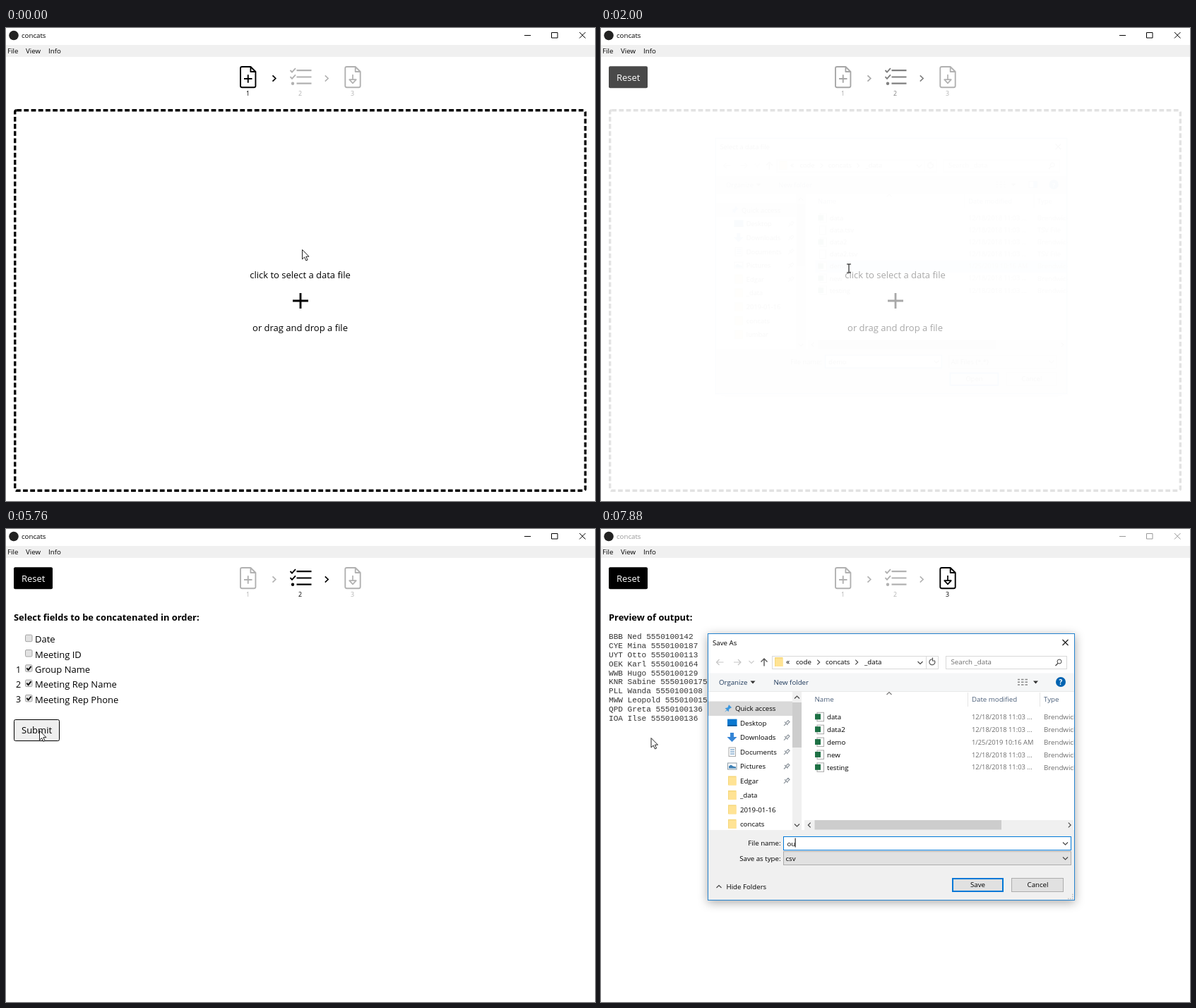
An HTML page for the animation above (8 s loop, 834 by 671 pixels).

```html
<!DOCTYPE html>
<html lang="en">
<head>
<meta charset="utf-8">
<title>concats</title>
<style>
html, body { margin: 0; width: 100%; height: 100%; overflow: hidden; background: #fff; }
svg { display: block; }
text { font-family: "Open Sans", "Noto Sans", sans-serif; white-space: pre; }
.mono { font-family: "Liberation Mono", monospace; fill: #333; }
.dialog { filter: drop-shadow(0 3px 7px rgba(0, 0, 0, .34)); }
#spot { mix-blend-mode: multiply; }
</style>
</head>
<body>
<script>
const LOOP = 8000;
const GREY = '#6d6d6d', BLUE = '#0078d7', DARK = '#444';

// Markup helpers; text is placed by the middle of its capitals.
const text = (x, y, s, size = 9.7, attr = '') =>
  `<text x="${x}" y="${y + size * .36}" font-size="${size}" ${attr}>${s}</text>`;
const rect = (x, y, w, h, fill, attr = '') =>
  `<rect x="${x}" y="${y}" width="${w}" height="${h}" fill="${fill}" ${attr}/>`;
const line = (d, color = '#000', width = 1, attr = '') =>
  `<path d="${d}" fill="none" stroke="${color}" stroke-width="${width}" ${attr}/>`;
const shape = (d, fill) => `<path d="${d}" fill="${fill}"/>`;
const group = (id, body, attr = '') => `<g id="${id}" ${attr}>${body}</g>`;
const frame = (x, y, w, h, fill, color, width = 1) =>
  rect(x, y, w, h, fill, `stroke="${color}" stroke-width="${width}"`);
const down = (x, y, color = DARK) => line(`M${x - 3.5} ${y - 1.5}l3.5 3.5 3.5-3.5`, color, 1.1);
const up = (x, y, color = DARK) => line(`M${x - 3.5} ${y + 2}l3.5-3.5 3.5 3.5`, color, 1.1);
const side = (x, y, dir, color = DARK) =>
  line(`M${x - dir * 1.7} ${y - 3.3}l${dir * 3.4} 3.3 ${-dir * 3.4} 3.3`, color, 1.1);
const drop = (x, y) => shape(`M${x - 3.5} ${y - 2}h7l-3.5 4z`, '#333');

// Main window
function windowBar() {
  return '<circle cx="11" cy="10.5" r="6.8" fill="#222"/>' +
    group('caption', text(22, 11, 'concats') +
      line('M734 10.5h9M772.5 6.5h8.5v7.5h-8.5zM812 6l8.5 8.5M820.5 6l-8.5 8.5')) +
    rect(0, 24, 834, 17, '#f0f0f0') +
    text(2, 32.5, 'File') + text(28, 32.5, 'View') + text(60, 32.5, 'Info');
}

const page = (x, inner) =>
  line(`M${x + 3} 55h12.2l7 7v20a2.2 2.2 0 0 1-2.2 2.2h-17a2.2 2.2 0 0 1-2.2-2.2v-24.8a2.2 2.2 0 0 1 2.2-2.2z` +
    `M${x + 15.2} 55v7h7`, '#000', 1.9, 'stroke-linejoin="round"') + inner;
const label = (x, n) => text(x, 92.5, n, 8.8, 'text-anchor="middle"');

function steps() {
  return group('step1', page(331.2, line('M337 72h11.5M342.75 66.25v11.5', '#000', 1.9)) + label(342.5, 1)) +
    group('arrow1', line('M377.5 67.3l4.3 4.2-4.3 4.2', '#000', 1.7)) +
    group('step2', line('M411.5 60.2h21M411.5 69.5h21M411.5 78.7h21', '#000', 2.2) +
      line('M402.5 60l2.5 2.7 5-5.5M402.5 69.2l2.5 2.7 5-5.5', '#000', 1.9) +
      '<circle cx="406" cy="78.7" r="2.2"/>' + label(416.5, 2)) +
    group('arrow2', line('M451.8 67.3l4.3 4.2-4.3 4.2', '#000', 1.7)) +
    group('step3', page(479.5, line('M491 66v7M486.2 73.2h9.6l-4.8 5.2z', '#000', 1.7, 'stroke-linejoin="round"')) +
      label(490.5, 3));
}

function dropPage() {
  const mid = 'text-anchor="middle"';
  return group('dash', rect(12.7, 116.7, 807.6, 539.6, 'none',
      'rx="2.5" stroke="#000" stroke-width="3.4" stroke-dasharray="6.8 3.4"')) +
    text(416.5, 350.5, 'click to select a data file', 13, mid) +
    line('M406 387h22M417 376v22', '#000', 2.8) +
    text(416.5, 425.5, 'or drag and drop a file', 13, mid);
}

const fields = ['Date', 'Meeting ID', 'Group Name', 'Meeting Rep Name', 'Meeting Rep Phone'];
const checkAt = { 2: 3480, 3: 4260, 4: 5050 };

function fieldPage() {
  const rows = fields.map((name, i) => {
    const y = 156.2 + i * 21.3;
    return rect(27.5, y - 6, 9.5, 9.5, '#e2e2e2', 'rx="1.5" stroke="#a3a3a3"') +
      text(41, y + .5, name, 13) +
      (checkAt[i] ? group('check' + i, text(14, y + .5, i - 1, 12.5) +
        line(`M29.3 ${y - 1.5}l2.3 2.6 4-5`, '#111', 1.9)) : '');
  });
  return text(11, 125, 'Select fields to be concatenated in order:', 12.9, 'font-weight="700"') +
    rows.join('') +
    group('submit', rect(11.5, 270.5, 64, 30, '#fff', 'id="submitBox" rx="2" stroke="#000"') +
      text(22, 285.7, 'Submit', 13));
}

const preview = ['BBB Ned 5550100142', 'CYE Mina 5550100187', 'UYT Otto 5550100113', 'OEK Karl 5550100164',
  'WWB Hugo 5550100129', 'KNR Sabine 5550100175', 'PLL Wanda 5550100108', 'MWW Leopold 5550100151',
  'QPD Greta 5550100136', 'IOA Ilse 5550100136'];

const previewPage = () =>
  text(11, 125, 'Preview of output:', 12.9, 'font-weight="700"') +
  preview.map((s, i) => text(11, 152.5 + i * 12.78, s, 11.08, 'class="mono"')).join('');

// File dialogs
const folder = (x, y) => rect(x, y - 6.5, 11.5, 13, '#f5d77a') + rect(x + 1, y - 5, 10.5, 11.5, '#ffe394');
const sheet = (x, y) => frame(x, y - 6, 9.5, 12.5, '#fff', '#a8a8a8');
const pin = (x, y) => line(`M${x - 4} ${y + 4}l3-3M${x - 3} ${y - 1.5}l4.5 4.5M${x - 1} ${y - .5}l3-3 2 2-3 3`, '#8a929a', 1.2);

const treeIcons = [
  y => shape(`M175 ${y + 5}l3-3.5-2.5-2 4-1 1.5-4 4 4-3.5 2-1 4-2-2z`, '#3a96dd'),
  y => rect(179, y - 5.5, 13.5, 10, '#0a78d0') + rect(179, y + 3, 13.5, 1.5, '#064f8c'),
  y => shape(`M183 ${y - 6.5}h5v6h4.5l-7 7-7-7h4.5z`, '#3585d6'),
  y => sheet(181, y) + line(`M183 ${y - 3}h6M183 ${y}h6M183 ${y + 3}h6`, '#4a86b8'),
  y => frame(179.5, y - 4.5, 12.5, 9, '#fff', '#8a9aa5') + shape(`M181 ${y + 3}v-3l3-2 3 2 4 1v2z`, '#3d7fb3')
];
const tree = ['Quick access', 'Desktop', 'Downloads', 'Documents', 'Pictures', 'Edgar',
  '_data', '2019-01-16', 'concats', 'lumbar'];

function fileRow(name, y) {
  const plain = name.endsWith('.tsv');
  return (plain ? sheet(305, y) : sheet(306, y) + rect(303, y - 4, 8, 8, '#1e7145')) +
    text(320, y + .3, name) +
    text(525, y + .3, name === 'demo' ? '1/25/2019 10:16 AM' : '12/18/2018 11:03 ...', 9.35, `fill="${GREY}"`) +
    text(627, y + .3, plain ? 'TSV File' : 'Brendwick', 9.7, `fill="${GREY}"`);
}

const button = (x, name, main) =>
  (main ? frame(x + 1, 496, 71, 18, '#e1e1e1', BLUE, 2) : frame(x - .5, 495.5, 73, 19, '#e1e1e1', '#adadad')) +
  text(x + 36.5, 505, name, 9.7, 'text-anchor="middle"');

function dialog(id, o) {
  const b = o.bottom, ink = 'fill="#1e395b"', head = 'fill="#4c607a"';
  const body = rect(151, 148, 521, 380, '#fff') +
    text(158, 161.5, o.title) + line('M653.5 157l8 8M661.5 157l-8 8', '#111', 1.1) +
    line('M173.5 189h-10m4-4l-4 4 4 4M188 189h10m-4-4l4 4-4 4', '#c6c6c6', 1.2) + down(213, 188.5, '#ccc') +
    line('M231 194.5v-10.5m-4.5 4.5l4.5-4.5 4.5 4.5', '#555', 1.4) +
    frame(242.5, 180.5, 235, 18, '#fff', '#d9d9d9') + folder(246, 188.5) +
    text(262, 188, '«', 10.5) + text(276, 188.5, 'code') + side(308, 189, 1) +
    text(318, 188.5, 'concats') + side(362, 189, 1) + text(373, 188.5, '_data') + down(452, 189.5) +
    line('M460.5 181v17', '#d9d9d9') + line('M472.5 187a4 4 0 1 1-3-2.2m0-2.3v4.5h3.5', '#555', 1.2) +
    frame(488.5, 180.5, 171, 18, '#fff', '#d9d9d9') + text(495.5, 189, 'Search _data', 9.7, `fill="${GREY}"`) +
    '<circle cx="649" cy="188" r="3" fill="none" stroke="#444"/>' + line('M647 190.5l-3.5 3.5', DARK, 1.3) +
    rect(152, 204.5, 520, 26.5, '#f5f6f7') + line('M152 230.5h520', '#e8e8e8') +
    text(167, 217.5, 'Organize', 9.7, ink) + drop(215, 217.5) + text(244.5, 217.5, 'New folder', 9.7, ink) +
    [0, 3.7, 7.4].map(dy => line(`M${o.viewX} ${213.5 + dy}h3m2 0h3.5m2 0h3.5`, '#888', 1.5)).join('') +
    drop(o.viewX + 25.5, 217.5) +
    (o.pane ? frame(614.5, 212.5, 12, 9, '#fff', '#667') + rect(621, 213, 5.5, 8.5, '#3a96dd') : '') +
    '<circle cx="651" cy="217" r="7" fill="#0063b1"/>' +
    text(651, 217.5, '?', 10, 'fill="#fff" font-weight="700" text-anchor="middle"') +
    rect(152, 244.5, 119, 20.5, '#d9d9d9') +
    tree.slice(0, o.treeRows).map((name, i) => {
      const y = 254.7 + i * 20.45;
      return (treeIcons[i] ? treeIcons[i](y) : folder(180, y)) + text(i ? 197 : 190, y + .3, name) +
        (i > 0 && i < 6 ? pin(263, y) : '');
    }).join('') +
    rect(271, 231, 13, b - 231, '#f0f0f0') + rect(271, 246, 13, o.thumb, '#cdcdcd') +
    up(277.5, 238.5) + down(277.5, b - 7) +
    up(408, 233, '#777') + line('M519.5 232v20M621.5 232v20', '#e5e5e5') +
    text(302.5, 242, 'Name', 9.7, head) + text(525, 242, 'Date modified', 9.7, head) + text(627, 242, 'Type', 9.7, head) +
    (o.hover || '') + o.files.map((name, i) => fileRow(name, 266.3 + i * 17.88)).join('') +
    rect(288, b - 14, 381, 14, '#f0f0f0') + rect(302.5, b - 14, 264.5, 13.5, '#cdcdcd') +
    side(295, b - 7, -1) + side(663.5, b - 7, 1) +
    rect(152, b, 520, 528 - b, '#f0f0f0') + o.footer +
    button(497, o.action, true) + button(582, 'Cancel') +
    [0, 3, 6].map(i => line(`M${661 + i} 524.5h1.5M667 ${518.5 + i}h1.5`, '#bbb', 1.5)).join('');
  return group(id, `<svg x="151" y="148" width="520" height="379" viewBox="151 148 520 379">${body}</svg>` +
    frame(151.5, 148.5, 519, 378, 'none', '#2583cf'), 'class="dialog"');
}

const combo = (x, y, w, s) =>
  frame(x, y, w, 19, '#e1e1e1', '#adadad') + text(x + 3, y + 10, s) + down(x + w - 8, y + 9.5);
const input = (id, x, y, w) =>
  frame(x, y, w, 19, '#fff', BLUE) + text(x + 5, y + 10, '', 9.7, `id="${id}Text"`) +
  line('M0 0v13', '#000', 1, `id="${id}Caret"`) + down(x + w - 8, y + 9.5);
const right = 'text-anchor="end"';

const openDialog = () => dialog('open', {
  title: 'Select a data file', action: 'Open', bottom: 461, treeRows: 10, thumb: 91, viewX: 566, pane: true,
  files: ['data', 'data.tsv', 'data2', 'data2.tsv', 'demo', 'new', 'testing'],
  hover: rect(299, 329, 372, 18, '#e5f3ff', 'id="hover"'),
  footer: text(308.5, 479.5, 'File name:', 9.7, right) + input('open', 313.5, 469.5, 172) +
    combo(496.5, 469.5, 159, 'All Files (*.*)')
});

const saveDialog = () => dialog('save', {
  title: 'Save As', action: 'Save', bottom: 427, treeRows: 9, thumb: 64, viewX: 590,
  files: ['data', 'data2', 'demo', 'new', 'testing'],
  footer: text(254.5, 446, 'File name:', 9.7, right) + input('save', 258.5, 436.5, 407) +
    text(254.5, 467.5, 'Save as type:', 9.7, right) + combo(258.5, 457.5, 407, 'csv') +
    up(167, 507) + text(177.5, 507.5, 'Hide Folders')
});

document.body.innerHTML = '<svg width="834" height="671" viewBox="0 0 834 671">' +
  windowBar() + steps() +
  group('page1', dropPage()) + group('page2', fieldPage()) + group('page3', previewPage()) +
  group('reset', rect(11, 54.3, 55, 31, '#000', 'rx="2"') + text(22, 70.5, 'Reset', 13, 'fill="#fff"')) +
  openDialog() + saveDialog() +
  '<circle id="spot" r="10" fill="#ff0" fill-opacity=".8"/>' +
  group('arrow', '<path d="M.5.5V14l3.1-3 2.3 5 2.2-1-2.3-4.8h4.2z" fill="#fff" stroke="#222"/>') +
  group('beam', line('M-3-6h2.5l.5.5.5-.5h2.5M0-5.5v11M-3 6h2.5l.5-.5.5.5h2.5', '#111', 1.1)) + '</svg>';

// Timeline
const el = id => document.getElementById(id);
const ramp = (t, a, b) => Math.min(1, Math.max(0, (t - a) / (b - a)));
const ease = p => p * p * (3 - 2 * p);
const within = (t, a, b) => t >= a && t < b;
const fade = (id, v) => {
  el(id).setAttribute('opacity', v);
  el(id).setAttribute('visibility', v > 0 ? 'visible' : 'hidden');
};
const set = (id, name, v) => el(id).setAttribute(name, v);

const path = [[0, 419, 314], [900, 419, 314], [1240, 372, 338], [1480, 351, 341], [2160, 351, 341],
  [2790, 89, 284], [3300, 55, 204], [3600, 55, 204], [4080, 55, 223.5], [4380, 55, 223.5],
  [4740, 53, 243], [5380, 53, 243], [5760, 47, 285.5], [6380, 47, 285.5], [6700, 70.5, 296], [LOOP, 70.5, 296]];
const clicks = [[370, 530], [1520, 1600], [1680, 1760], [3380, 3480], [4180, 4260], [4890, 5050], [6070, 6150]];

function pointer(t) {
  const i = path.findIndex(k => k[0] > t), [a, x, y] = path[i - 1], [b, u, v] = path[i];
  const p = ease(ramp(t, a, b));
  return [x + (u - x) * p, y + (v - y) * p];
}

function showDialog(id, shown, closing) {
  const s = .9 + .1 * (1 - (1 - shown) ** 3) - .042 * closing;
  fade(id, Math.min(1, shown * 1.5) * (1 - closing));
  set(id, 'transform', `translate(411 338) scale(${s}) translate(-411 -338)`);
}

function typed(id, s, x, y, caret) {
  el(id + 'Text').textContent = s;
  set(id + 'Caret', 'transform', `translate(${x + .5 + s.length * 5.8} ${y})`);
  fade(id + 'Caret', caret ? 1 : 0);
}

function draw(t) {
  const blocked = within(t, 530, 1930) || t >= 6450;
  set('caption', 'fill', blocked ? '#999' : '#000');
  el('caption').querySelector('path').setAttribute('stroke', blocked ? '#999' : '#000');

  // The window stays frozen until the file dialog has closed, then catches up.
  const since = (a, b) => t < 1995 ? 0 : ramp(t, a, b);
  const to2 = since(1900, 2260), to3 = ramp(t, 6200, 6800);
  fade('page1', 1 - since(1870, 2070));
  fade('dash', 1 - .67 * ramp(t, 560, 900));
  fade('reset', since(1795, 2085));
  fade('page2', ramp(t, 2080, 2320) * (1 - ramp(t, 6150, 6290)));
  fade('page3', ramp(t, 6290, 6480));

  const first = 1 - .7 * since(1700, 2020), second = .3 + .7 * to2 * (1 - ramp(t, 6180, 6480));
  fade('step1', first);
  fade('arrow1', first);
  fade('step2', second);
  fade('arrow2', second);
  fade('step3', .3 + .7 * to3);

  for (const i in checkAt) fade('check' + i, t >= checkAt[i] ? 1 : 0);
  fade('submit', .4 + .6 * ramp(t, 3500, 3960));
  set('submitBox', 'fill', t >= 5640 ? '#efefef' : '#fff');

  showDialog('open', ramp(t, 530, 780), ramp(t, 1930, 2002.5));
  showDialog('save', ramp(t, 6380, 6620), 0);
  const [x, y] = pointer(t);
  fade('hover', within(y, 329, 347) ? 1 : 0);
  set('hover', 'fill', t >= 1600 ? '#cce8ff' : '#e5f3ff');
  typed('open', t >= 1600 ? 'demo' : '', 316, 473, t < 1600);
  typed('save', t < 7710 ? '' : t < 7880 ? 'o' : 'ou', 263, 438.5, t < 7010 || t >= 7490);

  const beam = within(t, 1960, 2200), at = `translate(${x} ${y})`;
  for (const id of ['spot', 'arrow', 'beam']) set(id, 'transform', at);
  fade('spot', clicks.some(([a, b]) => within(t, a, b)) ? 1 : 0);
  fade('arrow', beam ? 0 : 1);
  fade('beam', beam ? 1 : 0);
}

function tick() {
  draw(performance.now() % LOOP);
  requestAnimationFrame(tick);
}
tick();
</script>
</body>
</html>
```
